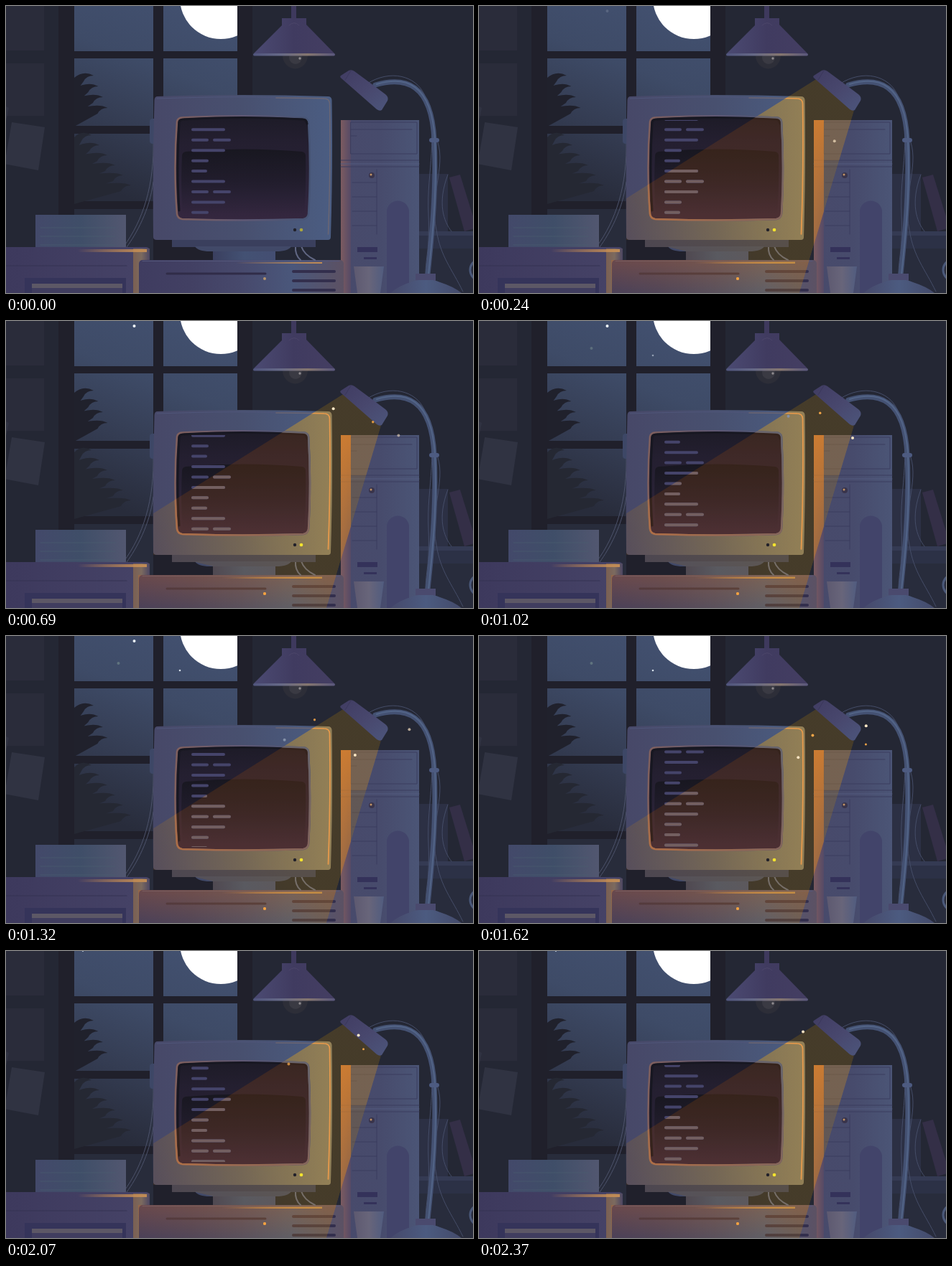
These frames come from a looping animation (650 px wide and 400 px high, 2.4 s). An HTML page:

```html
<!DOCTYPE html>
<html lang="en">
<head>
<meta charset="utf-8">
<title>Night desk</title>
<style>
html, body { margin: 0; width: 100%; height: 100%; overflow: hidden; background: #242734; }
svg { display: block; width: 650px; height: 400px; }
.lit { clip-path: url(#beamClip); }
.off .lit { display: none; }
.line { fill: none; stroke-linecap: round; }
</style>
</head>
<body>
<svg id="scene" class="off" viewBox="0 0 650 400">
<defs id="defs">
  <clipPath id="beamClip"><path id="beam" d="M469 102 522 146 446 400H184V354H288V342L263 336H231V326H205V268Z"/></clipPath>
  <clipPath id="textClip"><path d="M240 159H420V294H240Z"/></clipPath>
  <clipPath id="moonClip"><path d="M219 0H322V63H219Z"/></clipPath>
  <path id="caseShape" d="M211 126Q330 122 448 126Q453 126 453.500 131Q455 225 452 322Q452 326 448 326H210Q205 326 205 322Q204 225 206.500 131Q207 126 211 126Z"/>
  <path id="screenShape" d="M245 155.500Q330 151 414 155.500Q420 156 421 161Q425 225 421 290Q420 296 414 297Q330 300 245 297Q239 296 238 290Q233 225 238 161Q239 156 245 155.500Z"/>
  <path id="edge" d="M376 128Q420 128 443 129Q450 129 450.500 136Q452 225 448.500 318"/>
</defs>

<!-- wall and window -->
<path fill="#242734" d="M0 0H650V400H0Z"/>
<path fill="#2a2c3a" d="M0 0H53V62H0ZM0 80H53V153H0Z"/>
<path fill="#303342" d="M8 162 54 169 45 229-2 220ZM0 140 4 142 0 160Z"/>
<path fill="#20202b" d="M73 0H343V400H73Z"/>
<path fill="url(#sky)" d="M95 0H205V63H95ZM219 0H322V63H219ZM95 73H205V167H95ZM219 73H322V167H219ZM95 178H205V272H95ZM95 283H205V400H95Z"/>
<circle cx="299" cy="-11" r="57" fill="#fff" clip-path="url(#moonClip)"/>
<path id="lowLeaves" fill="#252833"/>
<path id="topLeaves" fill="#20212c"/>
<g id="stars"></g>

<!-- ceiling lamp -->
<path fill="#2d2e38" d="M385 69A17 18 0 0 0 420 69Z"/>
<circle cx="403" cy="72" r="9" fill="#3a3a43"/>
<circle cx="409" cy="73" r="1.700" fill="#8e8a8e"/>
<path fill="#3e395d" d="M397 0H404V18H397Z"/>
<path fill="url(#shade)" d="M384 17H418V26L457 66H345L384 27Z"/>
<path class="line" stroke="#4c466a" d="M394 27Q401 20 408 27"/>
<rect x="344" y="66" width="114" height="3.500" rx="1.700" fill="url(#rim)"/>

<!-- shelf -->
<path fill="#2c3044" d="M575 234H615V314H575Z"/>
<path fill="#342f47" d="M617 239 632 235 655 309 638 314Z"/>
<path fill="#343a53" d="M575 314H650V320H575Z"/>
<path fill="#2c3146" d="M575 320H650V338H575Z"/>
<path fill="#282c3c" d="M575 338H650V400H575Z"/>
<circle cx="661" cy="368" r="15" fill="none" stroke="#4a5879" stroke-width="3"/>

<!-- paper and printer -->
<path class="line" stroke="#4d536b" d="M205 185C207 250 190 300 164 335M205 245C200 285 181 318 168 336"/>
<path fill="url(#paper)" d="M41 291H167V337H41Z"/>
<path id="ruling" class="line" stroke="#4a6071" stroke-opacity=".6"/>
<path fill="url(#printer)" d="M0 336H195Q200 336 200 342V400H0Z"/>
<path fill="url(#printerEdge)" d="M177 338H200V400H177Z"/>
<path fill="url(#gold)" d="M100 339H196V343H100Z"/>
<path class="line" stroke="#353253" d="M0 362H168"/>
<path fill="#35345a" d="M26 379H167V400H26Z"/>
<path fill="#5d5866" d="M36 387H162V393H36Z"/>
<path fill="#403d5f" d="M36 393H162V400H36Z"/>

<!-- tower -->
<path fill="url(#tower)" d="M466 159H575V400H466Z"/>
<path fill="url(#strip)" d="M466 159H480V400H466Z"/>
<path class="line" stroke="#3b3d5e" d="M480 162H572V206H480ZM480 172H565M480 181H488M466 215H575M466 224H575M516 228V318"/>
<path class="line" stroke="#525b7f" d="M466 220H575"/>
<path id="slots" class="line" stroke="#3b3d5e"/>
<path fill="#42446a" d="M530 400V287A15.500 15.500 0 0 1 561 287V400Z"/>
<path fill="#34325a" d="M489 336H517V343H489ZM498 350H516V353H498Z"/>
<circle cx="509" cy="236" r="4" fill="#39344b"/>
<circle cx="508" cy="235" r="1.500" fill="#c39466"/>
<path class="lit" fill="url(#stripLit)" d="M466 159H480V400H466Z"/>
<path class="lit" fill="#f0a04a" fill-opacity=".14" d="M480 159H530V215H480Z"/>

<!-- desktop unit -->
<rect x="185" y="354" width="285" height="60" rx="5" fill="url(#desktop)"/>
<path class="line" stroke="#53567a" d="M190 355.500H464"/>
<path fill="url(#gold)" d="M320 357H440V359H320Z"/>
<path class="line" stroke="#302c48" stroke-width="3" d="M224 373H361"/>
<path id="vents" class="line" stroke="#332f4d" stroke-width="4"/>
<circle cx="360" cy="380" r="2" fill="#b5946c"/>
<g class="lit">
  <path fill="url(#deskGlow)" d="M184 354H470V400H184Z"/>
  <path fill="url(#gold)" d="M300 356.500H440V359H300Z"/>
</g>

<!-- monitor -->
<path class="line" stroke="#616783" stroke-width="2" d="M403 335Q402 347 410 354M411 335Q415 347 430 354"/>
<path fill="#3a3f5d" d="M231 326H431V336H231Z"/>
<path fill="#414968" d="M263 335H397Q393 342 376 342H284Q267 342 263 335Z"/>
<path fill="url(#neck)" d="M288 342H375V354H288Z"/>
<rect x="200" y="157" width="10" height="35" rx="4" fill="#3d4766"/>
<use href="#caseShape" fill="url(#casing)"/>
<path class="line" stroke="#50567a" d="M210 129Q330 125 376 128"/>
<use href="#edge" class="line" stroke="#796b70" stroke-opacity=".7" stroke-width="1.500"/>
<use href="#caseShape" class="lit" fill="url(#glow)"/>
<use href="#beam" class="lit" fill="url(#light)"/>
<use href="#edge" class="line lit" stroke="#e89a4c" stroke-width="1.700"/>

<!-- screen -->
<use href="#screenShape" fill="url(#glass)" stroke="url(#bezel)" stroke-width="2.500"/>
<path class="line" stroke="#171721" stroke-width="3" d="M241 285Q237 225 241 163Q242 158 247 158Q330 153 413 158Q418 158 419 164"/>
<path fill="url(#reflection)" d="M245 209Q245 204 250 203Q330 196 412 203Q417 204 417 209Q418 250 415 290H246Q243 250 245 209Z"/>
<use href="#screenShape" class="lit" fill="#a0500a" fill-opacity=".22" stroke="url(#bezelLit)" stroke-width="2.500"/>
<g clip-path="url(#textClip)" class="line" stroke-width="4">
  <path id="code" stroke="#45446a"/>
  <g class="lit"><use href="#code" id="codeLit"/></g>
</g>
<circle cx="402" cy="312" r="2.200" fill="#22212b"/>
<circle cx="411" cy="312" r="2.300" fill="#aaa63e"/>
<g class="lit">
  <circle cx="411" cy="312" r="2.300" fill="#f3e32f"/>
  <circle cx="360" cy="380" r="2" fill="#f5a240"/>
</g>

<!-- cup and desk lamp -->
<path fill="url(#cup)" d="M484 363H526L521 400H489Z"/>
<path class="line" stroke="#454d68" d="M503 108C535 88 570 97 582 123C604 180 585 230 588 290C590 340 584 350 584 374M601 190C612 225 589 265 599 312C605 350 620 365 636 398M615 235C600 275 609 300 620 314"/>
<path class="line" stroke="#445172" stroke-width="7" d="M514 110C556 98 592 108 596 186C599 250 594 310 587 374"/>
<path class="line" stroke="#526487" stroke-width="2" d="M516 109C556 97 592 107 597 186C600 250 595 310 588 374"/>
<rect x="589" y="184" width="14" height="6" rx="3" fill="#4d5b81"/>
<path fill="#4a4a6e" d="M570 373H598V383H570Z"/>
<path fill="url(#base)" d="M535 400Q546 390 566 384Q570 382 574 382H594Q600 383 604 385Q623 391 634 400Z"/>
<path fill="url(#head)" d="M466 97 477 90Q481 88 485 91L528 123Q533 127 531 132L523 145Q520 147 516 144L467 101Q464 99 466 97Z"/>
<path class="line" stroke="#3b385b" d="M480 90 472 103"/>
<g id="dust"></g>
</svg>

<script>
const LOOP = 2400;
const LAMP_ON = 60;
const PITCH = 14.44;
const byId = id => document.getElementById(id);
const clamp = v => Math.max(0, Math.min(1, v));

function add(parent, tag, attributes) {
  const node = document.createElementNS("http://www.w3.org/2000/svg", tag);
  for (const name in attributes) node.setAttribute(name, attributes[name]);
  return byId(parent).appendChild(node);
}

// Evenly spaced stops; the vector is relative to the painted box.
function gradient(id, colors, [x1, y1, x2, y2] = [0, 0, 1, 0], units = "objectBoundingBox") {
  add("defs", "linearGradient", { id, x1, y1, x2, y2, gradientUnits: units });
  const stops = colors.split(" ");
  stops.forEach((color, i) => add(id, "stop", { offset: i / (stops.length - 1), "stop-color": color }));
}

const down = [0, 0, 0, 1], rising = [0, 1, 1, 0], falling = [0, 0, 1, 1];
gradient("sky", "#42506f #3e4b67 #343c52 #282c3b", [250, 0, 150, 260], "userSpaceOnUse");
gradient("light", "#c88c0034 #c88c0034 #c8700016", [495, 124, 190, 410], "userSpaceOnUse");
gradient("shade", "#4b4a72 #403b60 #443e62");
gradient("rim", "#50557d #666987 #85766f #59577c");
gradient("casing", "#474868 #48506f #4b5d82");
gradient("glow", "#ffbe3c00 #ffbe3c24 #ffbe3c52");
gradient("bezel", "#80605d #5f5874 #465474");
gradient("bezelLit", "#b06f45 #85655a #66646c", rising);
gradient("glass", "#1d1b27 #241f30 #272134 #2d243a #35273f", down);
gradient("reflection", "#181720 #1d1a27aa #221d2e00", down);
gradient("neck", "#3a3f5f #435173 #444e72");
gradient("desktop", "#3f3c60 #424063 #47496c #4a577b #5c5163");
gradient("deskGlow", "#d0602f38 #d0602f00", down);
gradient("printer", "#3d395d #464367");
gradient("printerEdge", "#7a5f52 #7c6a5f #4c4662");
gradient("paper", "#43496a #3f4e68 #525770");
gradient("gold", "#f0a04a00 #c08c56");
gradient("tower", "#484a6b #474b6c #4b5576");
gradient("strip", "#7c5b60 #554a66");
gradient("stripLit", "#d97c3ae0 #d97c3a10", down);
gradient("cup", "#5d5970 #68657a #515c7f");
gradient("head", "#403c62 #48476d #4c557b", falling);
gradient("base", "#46496b #4c5b80 #434a6a");

// Evenly spaced horizontal lines
const rows = (id, x1, x2, y, step, count) =>
  byId(id).setAttribute("d", Array.from({ length: count }, (_, i) => `M${x1} ${y + i * step}H${x2}`).join(""));
rows("ruling", 48, 152, 309, 12, 3);
rows("slots", 482, 516, 246, 20, 4);
rows("vents", 400, 457, 370, 13, 3);

// Drooping blades whose tips step away from the window frame
function leaves(id, x, y, dx, dy, count) {
  let d = "";
  for (let i = 0; i < count; i++, x += dx, y += dy)
    d += `M95 ${y + 3}Q${x - 14} ${y - 8} ${x} ${y}Q${x - 10} ${y} ${x - 14} ${y + 8}L95 ${y + 26}Z`;
  byId(id).setAttribute("d", d);
}
leaves("topLeaves", 122, 97, 6.5, 15, 4);
leaves("lowLeaves", 119, 180, 11, 14, 6);

// Code lines as start/end pairs, repeated up the screen
const long = [260, 303], short = [260, 280], tiny = [260, 278], pair = [260, 280, 290, 311];
const pattern = [long, pair, long, short, tiny];

function codePath(scroll) {
  let d = "";
  for (let i = 0; i < 20; i++) {
    const line = pattern[i % 5];
    for (let k = 0; k < line.length; k += 2)
      d += `M${line[k]} ${172.4 + i * PITCH - scroll}H${line[k + 1]}`;
  }
  return d;
}

// Specks live from start to end, drift from one point to another and fade at both ends.
const specks = [];
function speck(parent, r, fill, start, end, [x0, y0], [x1, y1] = [x0, y0]) {
  specks.push({ dot: add(parent, "circle", { r, fill }), start, end, x0, y0, x1, y1 });
}
const cream = "#ffe8c6", amber = "#f2a548", grey = "#8490a8";
speck("stars", 2, "#f4fbff", 200, 1600, [178.5, 7]);
speck("stars", 2, "#60747f", 800, 2000, [156.5, 38]);
speck("stars", 1.3, "#d5e0ea", 900, 1950, [242, 48]);
speck("stars", 1.3, "#b9c6d6", 1850, 2900, [107, -0.4]);
speck("dust", 2, cream, 120, 1000, [499, 206], [416, 77]);
speck("dust", 1.7, amber, 500, 1500, [521, 148], [398, 110]);
speck("dust", 2, grey, 700, 1500, [456, 120], [356, 152]);
speck("dust", 2, cream, 540, 1900, [552, 158], [400, 172]);
speck("dust", 2, cream, 1100, 2700, [570, 134], [402, 107]);
speck("dust", 1.5, amber, 1400, 2250, [548, 158], [476, 131]);
speck("dust", 2, amber, 1400, 2200, [481, 129], [367, 163]);

byId("codeLit").setAttribute("stroke", "#735f60");
byId("code").removeAttribute("stroke");
byId("code").parentNode.setAttribute("stroke", "#45446a");

function draw() {
  const t = performance.now() % LOOP;
  byId("scene").classList.toggle("off", t < LAMP_ON);
  byId("code").setAttribute("d", codePath(10 * PITCH * t / LOOP));
  for (const { dot, start, end, x0, y0, x1, y1 } of specks) {
    const k = clamp((t - start) / (end - start));
    dot.setAttribute("cx", x0 + (x1 - x0) * k ** 1.5);
    dot.setAttribute("cy", y0 + (y1 - y0) * k);
    dot.setAttribute("opacity", clamp(1.6 * Math.sin(Math.PI * k)));
  }
  requestAnimationFrame(draw);
}
draw();
</script>
</body>
</html>
```
